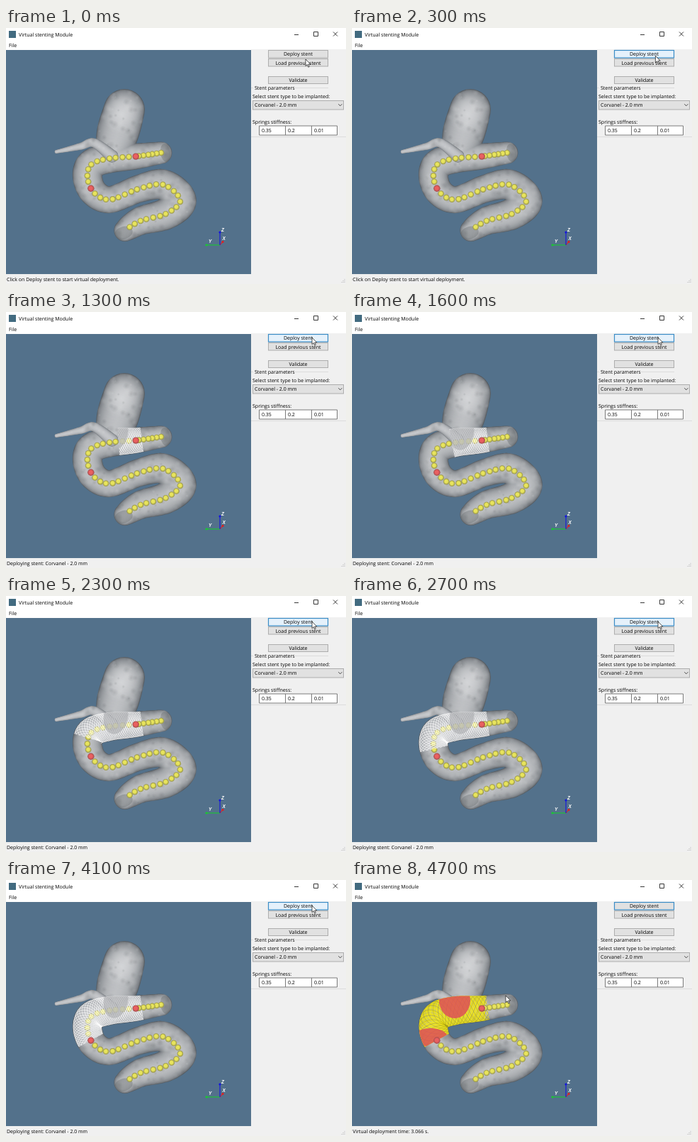
Recreate the animation shown at these times as an HTML page with a canvas. Size 480x361 px, loop 4.8 s.

```html
<!DOCTYPE html>
<html lang="en">
<head>
<meta charset="utf-8">
<title>Virtual stenting Module</title>
<style>
html, body { margin: 0; width: 100%; height: 100%; overflow: hidden; background: #f0f0f0; }
canvas, svg { position: absolute; left: 0; top: 0; display: block; }
text { font: 7px "Open Sans", "Noto Sans", sans-serif; fill: #000; text-rendering: geometricPrecision; }
.mid { text-anchor: middle; }
.btn { fill: #e1e1e1; stroke: #adadad; }
.btn.hover { fill: #e5f1fb; }
.btn.hover, .btn.focus { stroke: #3a8cc6; stroke-width: 1.2; }
.field { fill: #fff; stroke: #7a7a7a; }
.line { fill: none; stroke: #222; }
</style>
</head>
<body>
<canvas id="view" width="480" height="361"></canvas>
<svg width="480" height="361" viewBox="0 0 480 361">
  <path d="M0 0H480V30H346V31H0Z" fill="#fff"/>
  <path d="M346 30H480V361H0V347H346Z" fill="#f0f0f0"/>
  <rect x="4" y="4" width="10" height="10" fill="#426b80"/>
  <text x="18" y="11.5">Virtual stenting Module</text>
  <text x="4" y="26.5">File</text>
  <path class="line" d="M407 9.5H413M434.5 5.5H440.5V11.5H434.5ZM462 5.5L468 11.5M468 5.5L462 11.5" stroke-width=".9"/>

  <rect id="deploy" class="btn" x="370.5" y="31.5" width="84" height="10.5"/>
  <text class="mid" x="412.5" y="39.3">Deploy stent</text>
  <rect class="btn" x="370.5" y="43.5" width="84" height="10.5"/>
  <text class="mid" x="412.5" y="51.5">Load previous stent</text>
  <rect class="btn" x="370.5" y="68.5" width="84" height="10"/>
  <text class="mid" x="412.5" y="76">Validate</text>

  <path d="M346 84.5H349M408 84.5H455M346 153.5H480" stroke="#dcdcdc"/>
  <text x="351" y="87">Stent parameters</text>
  <text x="348" y="99">Select stent type to be implanted:</text>
  <rect class="btn" x="348.5" y="102.5" width="128" height="12.5"/>
  <text x="351" y="111.3">Corvanel - 2.0 mm</text>
  <path class="line" d="M469.3 107.3L471.8 109.8L474.3 107.3" stroke-width=".8"/>
  <text x="348" y="135">Springs stiffness:</text>
  <path class="field" d="M357.5 138H467.5V151H357.5ZM394.5 138V151M431.5 138V151"/>
  <text x="361" y="146.5">0.35</text><text x="398" y="146.5">0.2</text><text x="435" y="146.5">0.01</text>

  <text id="status" x="1" y="357"></text>
  <path d="M478 354V360M476 356V360M474 358V360" stroke="#b5b5b5" stroke-dasharray="1 1"/>
  <path id="cursor" d="M0 0V9.6L2.2 7.6L3.8 11.2L5.3 10.5L3.7 7.1H6.8Z" fill="#fff" stroke="#111" stroke-width=".7"/>
</svg>
<script>
const LOOP = 4800, STEP = 100, TAU = Math.PI * 2;
const PRESS = 800, START = 1000, FULL = 3000, DONE = 4200;
const $ = id => document.getElementById(id);
const ctx = $('view').getContext('2d');

const ramp = (t, from, to) => Math.min(1, Math.max(0, (t - from) / (to - from)));
const lerp = (a, b, f) => a.map((v, i) => v + (b[i] - v) * f);

// Catmull-Rom curve, resampled about one pixel apart
function curve(pts) {
  const last = pts.length - 1, out = [pts[0]];
  for (let i = 0; i < last; i++) {
    const a = pts[Math.max(i - 1, 0)], b = pts[i], c = pts[i + 1], d = pts[Math.min(i + 2, last)];
    for (let u = 0; u < 1; u += .004) {
      const p = b.map((v, j) => v + u * (c[j] - a[j]) / 2
        + u * u * (a[j] - 2.5 * v + 2 * c[j] - d[j] / 2)
        + u * u * u * (1.5 * (v - c[j]) + (d[j] - a[j]) / 2));
      const q = out[out.length - 1];
      if (Math.hypot(p[0] - q[0], p[1] - q[1]) >= 1) out.push(p);
    }
  }
  return out;
}

const withRadius = (line, radius) => line.map((p, i) => [...p, radius(i / (line.length - 1))]);

// Swelling in the bends, narrowing at both open ends
const vessel = withRadius(
  curve([[219, 176], [184, 181], [146, 184], [121, 192], [115, 210], [124, 232], [147, 242],
    [187, 227], [222, 221], [246, 243], [226, 262], [190, 272], [167, 286]]),
  u => 19 + 3 * u - 1.6 * Math.cos(2 * TAU * u) - 2 * Math.exp(-20 * u) - 5 * Math.exp(-25 * (1 - u)));
const dome = withRadius(curve([[167, 115], [151, 172]]), u => 29 + 4 * u - 13 * u ** 4);
const branch = withRadius(curve([[71, 174.5], [105, 167], [124, 162], [150, 181]]), u => 2.4 + 6.6 * u);

const PROXIMAL = vessel.findIndex(p => p[0] < 184);
const DISTAL = vessel.findIndex(p => p[1] > 226);
const STENT = PROXIMAL - 8, LENGTH = DISTAL - STENT;

function beads(from, to, gap) {
  const out = [];
  for (let s = from; s < to; s += gap) out.push(vessel[Math.round(s)]);
  return out;
}
const openBeads = [...beads(0, PROXIMAL - 3, 5.8), ...beads(DISTAL + 9, vessel.length, 8.6)];
const coveredBeads = beads(PROXIMAL + 8.5, DISTAL - 4, 8.5);

// Point on the stent wall: s along it, v across it from -1 to 1
function wall(s, v) {
  const i = STENT + Math.floor(s), p = vessel[i], a = vessel[i - 3], b = vessel[i + 3];
  const dx = b[0] - a[0], dy = b[1] - a[1], k = .96 * p[2] * v / Math.hypot(dx, dy);
  return [p[0] - dy * k, p[1] + dx * k];
}

let seed = 7;
const random = () => (seed = seed * 16807 % 2147483647) / 2147483647;

function tube(g, discs, dark, light) {
  const layers = 28;
  for (let i = 0; i < layers; i++) {
    const u = 1 - i / layers;
    g.fillStyle = `rgb(${lerp(dark, light, Math.sqrt(1 - u * u)).map(Math.round)})`;
    g.beginPath();
    for (const [x, y, r] of discs) {
      g.moveTo(x + r * u, y);
      g.arc(x, y, r * u, 0, TAU);
    }
    g.fill();
  }
}

function glow(g, x, y, r, rgb, alpha) {
  const fill = g.createRadialGradient(x, y, 0, x, y, r);
  fill.addColorStop(0, `rgba(${rgb},${alpha})`);
  fill.addColorStop(1, `rgba(${rgb},0)`);
  g.fillStyle = fill;
  g.fillRect(x - r, y - r, 2 * r, 2 * r);
}

function oval(g, x, y, rx, ry, turn, fill) {
  g.fillStyle = fill;
  g.beginPath();
  g.ellipse(x, y, rx, ry, turn, 0, TAU);
  g.fill();
}

function axis(g, x, y, color, label, lx, ly) {
  g.strokeStyle = color;
  g.lineWidth = 1.1;
  g.beginPath();
  g.moveTo(302, 306);
  g.lineTo(x, y);
  g.stroke();
  oval(g, x, y, 1.6, 1.6, 0, color);
  g.fillStyle = '#fff';
  g.font = 'italic bold 6.5px "Liberation Sans", sans-serif';
  g.fillText(label, lx, ly);
}

const backdrop = document.createElement('canvas');
backdrop.width = 480;
backdrop.height = 361;
{
  const g = backdrop.getContext('2d');
  tube(g, [...vessel, ...dome], [88, 94, 100], [190, 192, 195]);
  tube(g, branch, [112, 117, 122], [196, 198, 201]);
  g.globalCompositeOperation = 'source-atop';
  glow(g, 163, 122, 27, '226,227,229', .6);
  // Uneven vessel surface
  for (let i = 0; i < 500; i++) {
    const rgb = random() < .5 ? '240,240,240' : '60,64,68';
    glow(g, 65 + random() * 210, 80 + random() * 225, 2 + random() * 5, rgb, .13);
  }
  oval(g, 225, 176, 7, 13, -.15, 'rgba(92,96,100,.35)');
  oval(g, 166, 289, 13, 9, -.3, 'rgba(92,96,100,.35)');
  g.globalCompositeOperation = 'destination-over';
  g.fillStyle = '#53718b';
  g.fillRect(0, 30, 346, 317);
  g.globalCompositeOperation = 'source-over';
  axis(g, 283, 306, '#19c832', 'Y', 286, 303);
  axis(g, 306, 301.5, '#e02020', 'X', 305.5, 298.5);
  axis(g, 302, 288, '#1414e0', 'Z', 304, 287);
}

function ball([x, y], r, light, dark) {
  const fill = ctx.createRadialGradient(x - .5, y - .7, 0, x, y, r);
  fill.addColorStop(0, light);
  fill.addColorStop(.5, light);
  fill.addColorStop(1, dark);
  oval(ctx, x, y, r, r, 0, fill);
}
const yellowBall = p => ball(p, 4.3, '#e8e45c', '#918f48');
const redBall = p => ball(p, 4.7, '#ea6060', '#a04a4c');

function clipStent(len) {
  ctx.beginPath();
  for (let s = 0; s <= len; s++) ctx.lineTo(...wall(s, 1));
  for (let s = Math.floor(len); s >= 0; s--) ctx.lineTo(...wall(s, -1));
  ctx.clip();
}

function braid(len, color, width, wires) {
  ctx.strokeStyle = color;
  ctx.lineWidth = width;
  ctx.beginPath();
  for (let k = 0; k < wires; k++) {
    for (const turn of [-.13, .13]) {
      for (let s = 0; s <= len; s++) {
        const p = wall(s, Math.cos(k * TAU / wires + s * turn));
        s ? ctx.lineTo(...p) : ctx.moveTo(...p);
      }
    }
  }
  ctx.stroke();
}

function drawMesh(len) {
  ctx.save();
  clipStent(len);
  ctx.fillStyle = 'rgba(225,227,229,.28)';
  ctx.fillRect(80, 150, 130, 100);
  braid(len, 'rgba(255,255,255,.6)', .6, 18);
  oval(ctx, 155, 170, 17, 25, .2, 'rgba(168,170,173,.6)');
  ctx.restore();
}

function drawResult() {
  ctx.save();
  clipStent(LENGTH);
  ctx.fillStyle = 'rgba(228,218,30,.7)';
  ctx.fillRect(80, 150, 108, 100);
  braid(LENGTH, 'rgba(255,244,0,.6)', .7, 14);
  braid(LENGTH, 'rgba(120,112,40,.3)', .5, 9);
  oval(ctx, 145, 170, 22, 25, 0, 'rgba(222,80,86,.85)');
  oval(ctx, 111, 222, 24, 13, 0, 'rgba(222,80,86,.85)');
  ctx.restore();
}

function draw(t) {
  const done = t >= DONE, len = LENGTH * ramp(t, START, FULL) ** .65;
  const rise = lerp([423, 44], [432, 36], ramp(t, 0, 500));
  const [x, y] = lerp(rise, [217, 163], ramp(t, 4300, 4700));

  ctx.drawImage(backdrop, 0, 0);
  if (done) drawResult();
  else {
    coveredBeads.forEach(yellowBall);
    if (len > 0) drawMesh(len);
  }
  openBeads.forEach(yellowBall);
  [vessel[PROXIMAL], vessel[DISTAL]].forEach(redBall);

  const over = x > 370 && x < 455 && y < 42;
  $('deploy').setAttribute('class', 'btn' + (over ? ' hover' : '') + (t >= PRESS ? ' focus' : ''));
  $('cursor').setAttribute('transform', `translate(${x} ${y})`);
  $('status').textContent = done ? 'Virtual deployment time: 3.066 s.'
    : t >= START ? 'Deploying stent: Corvanel - 2.0 mm'
    : 'Click on Deploy stent to start virtual deployment.';
}

const begin = performance.now();
let shown = -1;
function tick() {
  const t = Math.floor((performance.now() - begin) % LOOP / STEP) * STEP;
  if (t !== shown) draw(shown = t);
  requestAnimationFrame(tick);
}
tick();
</script>
</body>
</html>
```
